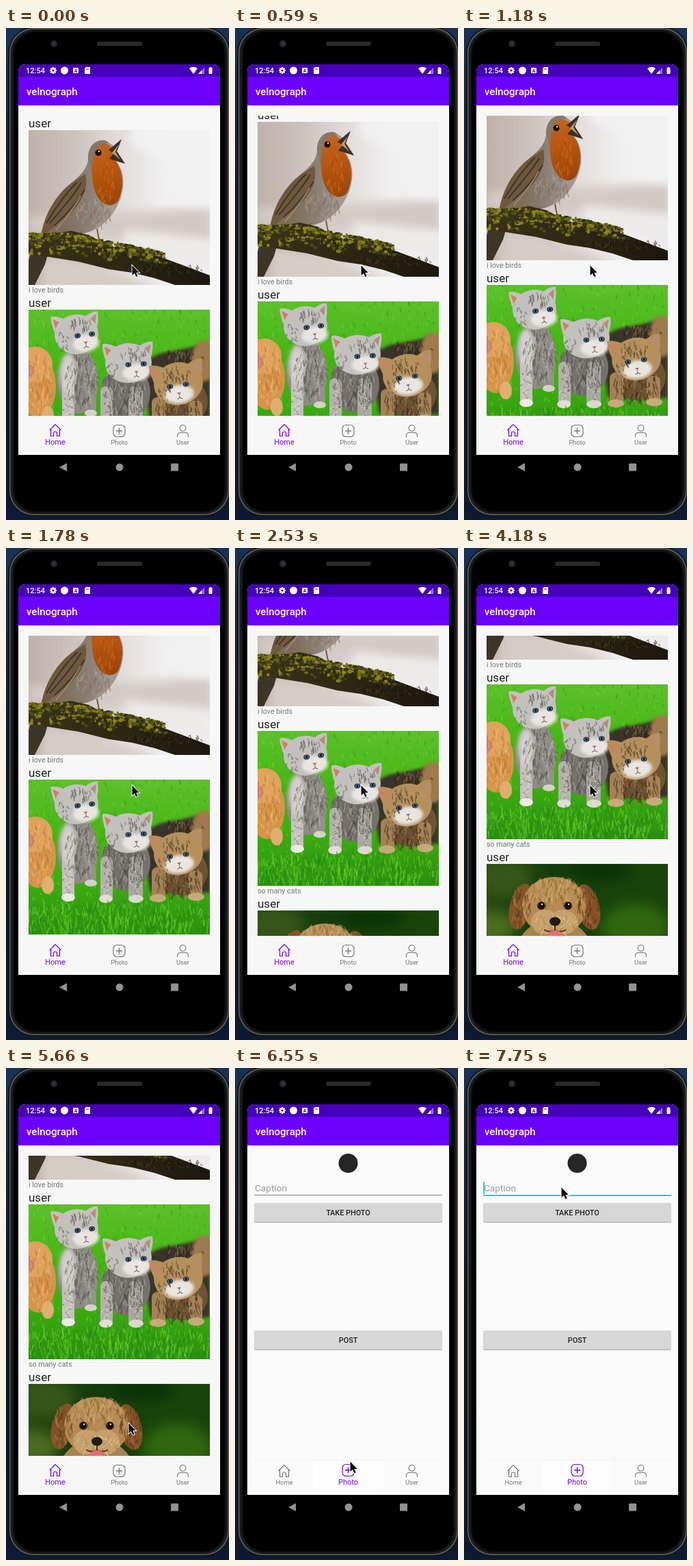
Recreate the animation shown at these times as an HTML page with a canvas. Size 326 by 718 pixels, loop 8 s.

```html
<!DOCTYPE html>
<html lang="en">
<head>
<meta charset="utf-8">
<title>Photo feed</title>
<style>
html, body { margin: 0; width: 100%; height: 100%; overflow: hidden; background: #0b1930; }
canvas { display: block; width: 326px; height: 718px; }
</style>
</head>
<body>
<canvas id="stage" width="326" height="718"></canvas>
<script>
const LOOP = 8000;
const PURPLE = '#6c00fb', DEEP_PURPLE = '#4500b9', GREY = '#757575', TEAL = '#1fd5c3';
const PHOTO_W = 265, PHOTO_H = 226, POST_H = 262;
const stage = document.getElementById('stage').getContext('2d');
let g = stage;

// [time, value...]: values hold until the next time
const scrollSteps = [[0, 0], [140, 3], [290, 7], [590, 12], [740, 18], [890, 24], [1040, 30],
  [1180, 36], [1330, 46], [1480, 56], [1630, 66], [1780, 73], [1930, 79], [2230, 100],
  [2380, 122], [2530, 144], [2830, 149], [3280, 155], [3430, 161], [3580, 167], [4030, 190], [4180, 212]];
const pointerSteps = [[0, 184, 346], [4480, 192, 400], [4630, 214, 510], [4780, 224, 617],
  [4920, 190, 604], [5070, 166, 596], [5660, 179, 518], [5810, 176, 552], [5960, 168, 574],
  [6850, 165, 540], [7000, 160, 455], [7150, 154, 350], [7300, 148, 250], [7450, 143, 185], [7600, 142, 174]];
const OPEN_FORM = 6400, FOCUS = 7600;

const at = (steps, t) => steps.findLast(s => s[0] <= t).slice(1);

function rng(seed) {
  return () => (seed = (seed * 16807) % 2147483647) / 2147483647;
}
function rect(x, y, w, h, color) {
  g.fillStyle = color;
  g.fillRect(x, y, w, h);
}
function round(x, y, w, h, r, color) {
  g.fillStyle = color;
  g.beginPath();
  g.roundRect(x, y, w, h, r);
  g.fill();
}
function oval(x, y, rx, ry, color, turn = 0) {
  g.fillStyle = color;
  g.beginPath();
  g.ellipse(x, y, rx, ry, turn, 0, 7);
  g.fill();
}
function shape(d, color) {
  g.fillStyle = color;
  g.fill(new Path2D(d));
}
function line(d, color, width = 1) {
  g.strokeStyle = color;
  g.lineWidth = width;
  g.stroke(new Path2D(d));
}
function text(s, x, y, size, color, weight = 400, align = 'left') {
  g.font = `${weight} ${size}px Roboto, sans-serif`;
  g.textAlign = align;
  g.textBaseline = 'alphabetic';
  g.fillStyle = color;
  g.fillText(s, x, y);
}
function shade(x0, y0, x1, y1, ...colors) {
  const grad = g.createLinearGradient(x0, y0, x1, y1);
  colors.forEach((c, i) => grad.addColorStop(i / (colors.length - 1), c));
  return grad;
}
function blur(radius, draw) {
  g.filter = `blur(${radius}px)`;
  draw();
  g.filter = 'none';
}
// Short soft strokes scattered inside an ellipse
function fur(x, y, rx, ry, colors, count, seed, lean = 2, length = 6) {
  const rand = rng(seed);
  g.globalAlpha = .6;
  for (let i = 0; i < count; i++) {
    const a = rand() * 6.283, r = Math.sqrt(rand());
    const px = x + Math.cos(a) * r * rx, py = y + Math.sin(a) * r * ry;
    const dx = (rand() - .5) * lean * 2, dy = length * (.5 + rand());
    line(`M${px} ${py}l${dx} ${dy}`, colors[i % colors.length], 1 + rand());
  }
  g.globalAlpha = 1;
}
function photo(draw) {
  const c = document.createElement('canvas');
  c.width = PHOTO_W;
  c.height = PHOTO_H;
  g = c.getContext('2d');
  draw();
  g = stage;
  return c;
}

function bird() {
  rect(0, 0, 265, 226, shade(0, 0, 265, 0, '#bfb2aa', '#cdc3bd', '#e2dddb', '#f1f0f1', '#f3f2f3'));
  blur(7, () => {
    shape('M0 125C90 118 150 122 200 116L270 112V165L150 160L0 150Z', '#d3cac5');
    shape('M150 -5H275V112C220 112 190 90 208 72C225 58 190 40 150 20Z', '#f2f1f2');
    shape('M140 145L270 160V210L140 170Z', '#ece9e9');
    shape('M20 182L90 196L200 235H20Z', '#d6ccc6');
  });
  shape('M8 160L30 175L24 196L9 226H0V190Z', '#3d3528');
  const body = shade(50, 110, 125, 110, '#7d6c57', '#8b8077', '#a29a93');
  shape('M87 44C86 24 97 13 112 15L126 24L136 14L129 31L141 49L128 45C139 59 142 78 134 101C124 126 108 143 84 150C60 156 36 152 18 158C22 126 38 96 63 77C77 65 84 58 87 44Z', body);
  shape('M91 46C90 28 99 20 112 19L124 27L121 40L128 46C139 62 140 84 131 103C121 116 105 108 98 92C92 78 93 62 91 46Z', shade(90, 20, 125, 110, '#c2661f', '#b7550f', '#994409'));
  shape('M87 40C88 22 98 14 112 15L118 19C105 20 97 25 95 40L92 60Z', '#85776a');
  shape('M83 64C88 86 78 108 54 127L18 157C22 122 42 93 63 77Z', '#6f583d');
  line('M77 77Q64 98 31 136M82 87Q66 114 38 139M71 76Q50 96 26 136', '#40352a', 2);
  line('M76 96Q64 118 40 146', '#a48f74', 1.5);
  fur(95, 118, 24, 22, ['#7d746b', '#b0a8a0', '#95705a'], 90, 12, 3, 6);
  fur(114, 75, 15, 28, ['#a84d0c', '#c96e25'], 70, 13, 2, 6);
  shape('M117 29L136 13L129 31L141 49L118 42L124 34Z', '#3d3026');
  shape('M122 33L132 21L127 32L134 43Z', '#c39a71');
  oval(102, 33, 4.6, 4.6, '#17120f');
  oval(103, 31, 1.2, 1.2, '#ddd');
  line('M78 148L72 156M100 144L103 160L115 168', '#765b43', 2);
  shape('M0 151L42 150L62 147L88 153L117 169L151 174L190 184L217 194L265 212V226H214L184 216L151 208L117 203L73 192L29 185L0 181Z', shade(0, 160, 265, 200, '#393218', '#2d2713', '#1c170e'));
  const rand = rng(71);
  for (let i = 0; i < 420; i++) {
    const x = rand() * 200, depth = rand() * rand();
    const y = 151 + (x > 60 ? (x - 60) * .2 : 0) + depth * (x < 130 ? 34 : 24);
    oval(x, y, 1 + rand() * 3, 1 + rand() * 2, ['#6f6b18', '#8b8419', '#4a4a17', '#343116'][i % 4]);
  }
  fur(200, 200, 55, 9, ['#49401f', '#17130d'], 60, 5, 5, 4);
}

// The face sits off-centre by turn, as the head looks aside
function kittenHead(x, y, rx, ry, coat, stripe, turn, tilt, seed) {
  g.save();
  g.translate(x, y);
  g.rotate(tilt);
  for (const s of [-1, 1]) {
    shape(`M${s * rx * .3} ${-ry * .7}Q${s * rx * .8} ${-ry * 1.1} ${s * rx * 1.08} ${-ry * 1.02}Q${s * rx * 1.1} ${-ry * .5} ${s * rx * .9} 0Z`, coat);
    shape(`M${s * rx * .58} ${-ry * .6}L${s * rx} ${-ry * .9}L${s * rx * .88} ${-ry * .25}Z`, s < 0 ? '#d08060' : '#b58c7c');
  }
  oval(0, 0, rx, ry, coat);
  blur(2, () => oval(turn, ry * .5, rx * .6, ry * .42, '#e9e6e2'));
  fur(turn * .6, -ry * .55, rx * .55, ry * .32, [stripe], 26, seed, 2, 6);
  fur(-rx * .65, ry * .2, rx * .25, ry * .5, [stripe], 14, seed + 1, 4, 4);
  for (const s of [-1, 1]) {
    const ex = turn + s * rx * .33;
    oval(ex, ry * .08, 4.4, 3.6, '#2b2f33');
    oval(ex, ry * .08, 3, 2.7, '#46779f');
    oval(ex, ry * .08, 1.5, 1.9, '#090c10');
  }
  shape(`M${turn - 3} ${ry * .42}h6l-3 4Z`, '#a8746c');
  line(`M${turn} ${ry * .56}v3l-4 2m4 -2l4 2`, '#6b5f58');
  g.restore();
}

function kittens() {
  rect(0, 0, 265, 226, shade(0, 0, 0, 226, '#5cc02c', '#48b714', '#3cad10', '#2b8f10'));
  fur(132, 95, 185, 130, ['#6fd03a', '#36a010', '#51c41c'], 800, 17, 3, 5);
  blur(2, () => {
    shape('M165 90Q175 62 215 60L250 52L265 60V165L178 164Z', '#3a3329');
    oval(256, 75, 18, 30, '#a07a4c');
  });
  fur(225, 70, 32, 14, ['#2c2416', '#8c7350'], 60, 8, 4, 8);

  oval(14, 112, 26, 46, '#d6954b');
  oval(10, 80, 25, 26, '#dfa35c');
  shape('M0 72L10 90L0 104Z', '#d18266');
  fur(16, 108, 20, 45, ['#bd7630', '#eebb7b'], 90, 23, 2, 7);
  oval(28, 154, 9, 13, '#dfae70');

  oval(72, 104, 30, 48, '#8e8b85');
  round(49, 102, 18, 74, 8, '#c4c1bc');
  round(83, 92, 16, 60, 8, '#94918b');
  blur(3, () => oval(58, 92, 12, 28, '#d3d1cd'));
  fur(78, 98, 23, 42, ['#55524d', '#74716b', '#b9b6b0'], 150, 31, 4, 8);
  fur(58, 140, 7, 26, ['#77736b', '#e6e3df'], 30, 32, 5, 2);
  oval(58, 172, 10, 6, '#eeeae4');
  oval(91, 151, 9, 5, '#d6d2c9');
  kittenHead(70, 36, 32, 29, '#c3c1bd', '#65625d', 12, -.12, 9);

  oval(142, 121, 36, 41, '#75726c');
  round(105, 112, 18, 67, 8, '#b4b1ab');
  round(146, 112, 21, 66, 8, '#aaa7a1');
  fur(138, 116, 32, 36, ['#44423e', '#a8a59f', '#605d57'], 160, 43, 4, 8);
  fur(114, 149, 7, 22, ['#5b5852', '#dddad5'], 28, 44, 5, 2);
  fur(157, 148, 8, 22, ['#5b5852', '#dddad5'], 28, 45, 5, 2);
  oval(113, 174, 10, 6, '#e3ded5');
  oval(157, 174, 11, 6, '#ddd8cf');
  kittenHead(146, 78, 34, 29, '#c3c1be', '#65625e', 11, -.05, 19);

  oval(224, 134, 38, 35, '#6e5233');
  round(180, 128, 20, 50, 8, '#a38355');
  round(234, 133, 20, 43, 8, '#a38355');
  fur(220, 143, 34, 25, ['#392c1e', '#a98452', '#66492a'], 140, 58, 4, 8);
  oval(189, 173, 12, 6, '#c7aa7b');
  oval(245, 171, 12, 6, '#c7aa7b');
  kittenHead(219, 108, 36, 31, '#b5905d', '#4d3a26', -1, -.15, 29);

  fur(135, 200, 165, 25, ['#57c420', '#238512', '#6fd434', '#319a10'], 600, 67, 4, 11);
}

function puppy() {
  rect(0, 0, 265, 226, shade(0, 0, 265, 100, '#2c4d10', '#143c0b', '#17440a', '#1a430a'));
  blur(9, () => {
    oval(27, 22, 40, 26, '#34561a');
    oval(218, 92, 50, 34, '#2f660f');
    oval(168, 10, 47, 14, '#0c3007');
    oval(8, 92, 35, 24, '#4a6c20');
  });
  oval(99, 135, 57, 55, '#a98352');
  oval(50, 62, 16, 34, '#835328', .25);
  oval(148, 63, 17, 34, '#825127', -.25);
  oval(99, 62, 47, 43, '#b58b53');
  fur(100, 38, 44, 20, ['#d1ae75', '#86602f', '#c49658'], 160, 73, 5, 9);
  fur(50, 60, 14, 29, ['#593519', '#a87338'], 60, 74, 3, 8);
  fur(149, 62, 15, 29, ['#552f18', '#a16a32'], 60, 75, 3, 8);
  oval(86, 85, 21, 18, '#c6a16b');
  oval(112, 85, 21, 18, '#c6a16b');
  fur(99, 87, 34, 14, ['#e2c995', '#a98350'], 60, 76, 5, 5);
  for (const x of [80, 119]) {
    oval(x, 61, 6, 6, '#352111');
    oval(x, 61, 4, 4.5, '#100c0a');
    oval(x + 1, 59, 1.2, 1.2, '#ddd');
  }
  oval(100, 84, 8, 6.5, '#201b19');
  line('M100 90V97Q92 101 84 96M100 97Q108 101 116 96', '#4c2b1a', 2);
  oval(100, 104, 11, 7, '#e46f72');
}

const posts = [
  [photo(bird), 'i love birds'],
  [photo(kittens), 'so many cats'],
  [photo(puppy), '']
];

function phone() {
  rect(0, 0, 326, 718, shade(0, 0, 0, 718, '#173358', '#0c1426', '#0c1a33'));
  round(3, -2, 325, 715, 38, '#151718');
  round(5, 0, 321, 711, 36, '#5c6062');
  round(6.5, 1.5, 318, 708, 35, '#1b1d1e');
  round(10, 4, 311, 703, 33, '#0b0c0c');
  round(12, 6, 307, 699, 32, '#000');
  oval(70, 23, 5, 5, '#242628');
  oval(70, 23, 2.5, 2.5, '#2a3a48');
  round(133, 20, 66, 6, 3, '#2b2d2e');
  for (let x = 136; x < 198; x += 3) rect(x, 22, 1, 2, '#17191a');
  shape('M78 641L89 635V647Z', '#929292');
  oval(166, 641, 5.5, 5.5, '#929292');
  round(241, 635.5, 11, 11, 1, '#929292');
}

function statusBar() {
  text('12:54', 29, 66, 11, '#fff', 500);
  for (let i = 0; i < 8; i++) {
    const a = i * Math.PI / 4;
    line(`M69 62l${Math.cos(a) * 5} ${Math.sin(a) * 5}`, '#fff', 2);
  }
  oval(69, 62, 3.7, 3.7, '#fff');
  oval(69, 62, 1.6, 1.6, DEEP_PURPLE);
  oval(85.5, 62, 5.5, 5.5, '#fff');
  round(98, 58, 8, 8, 1, '#fff');
  text('A', 102, 65, 7, DEEP_PURPLE, 700, 'center');
  shape('M117 57H123V67H115V59Z', '#fff');
  line('M118 59v2M120 59v2', DEEP_PURPLE, 1);
  shape('M268 59Q274 54.5 280 59L274 67Z', '#fff');
  shape('M281 67L290 58V67Z', '#9971dd');
  shape('M281 67L286 62V67Z', '#fff');
  round(296.5, 58, 5, 9, .7, '#fff');
  rect(298, 57, 2, 1, '#fff');
}

function tab(label, x, active, drawIcon) {
  const color = active ? PURPLE : GREY;
  g.save();
  g.translate(x, active ? 587 : 588);
  drawIcon(color);
  g.restore();
  text(label, x, 607.5, active ? 11 : 9.4, color, 400, 'center');
}

function tabs(form) {
  tab('Home', 72, !form, c =>
    line('M-8.5 0L0 -8.5L8.5 0M-6.5 -1.5V8.5H-2.5V3.5Q0 .5 2.5 3.5V8.5H6.5V-1.5', c, 1.2));
  tab('Photo', 165.5, form, c => {
    g.strokeStyle = c;
    g.lineWidth = 1.2;
    g.beginPath();
    g.roundRect(-8.5, -8.5, 17, 17, 5);
    g.stroke();
    line('M-4.5 0H4.5M0 -4.5V4.5', c, 1.3);
  });
  tab('User', 258.5, false, c =>
    line('M-4.5 -4a4.5 4.5 0 1 0 9 0a4.5 4.5 0 1 0 -9 0M-8 9V7Q-8 2.5 -3 2.5H3Q8 2.5 8 7V9', c, 1.1));
}

function feed(scroll) {
  g.save();
  g.beginPath();
  g.rect(33, 128, PHOTO_W, 438);
  g.clip();
  posts.forEach(([picture, caption], i) => {
    const y = 128 + i * POST_H - scroll;
    text('user', 33, y + 17, 17, '#202020');
    g.drawImage(picture, 33, y + 21);
    text(caption, 33, y + 258, 10.7, GREY);
  });
  g.restore();
}

function button(label, y) {
  round(28, y + 1, 275, 28, 2, '#bfc0bf');
  round(28, y, 275, 27, 2, '#d6d7d6');
  text(label, 165.5, y + 17.5, 10.9, '#202020', 500, 'center');
}

function form(focused) {
  oval(165.5, 139, 14, 14, '#262626');
  text('Caption', 29, 180, 13.6, '#9a9a9a');
  if (focused) {
    rect(28, 185, 275, 2, TEAL);
    rect(28, 166, 2, 18, TEAL);
  } else {
    rect(28, 185, 275, 1, '#858585');
  }
  button('TAKE PHOTO', 197);
  button('POST', 383);
  rect(28, 572, 275, 1, '#f4f4f4');
  rect(114, 573, 103, 43, '#fdfdfd');
}

function pointer(x, y) {
  g.save();
  g.translate(x + .5, y + .5);
  const arrow = 'M0 0V14.5L3.4 11.4L5.8 16.8L8.2 15.7L5.8 10.5H10.2Z';
  line(arrow, '#fff', 1.8);
  shape(arrow, '#080808');
  g.restore();
}

function frame(now) {
  const t = now % LOOP, opened = t >= OPEN_FORM;
  phone();
  g.save();
  g.beginPath();
  g.roundRect(18, 53, 295, 570, [10, 10, 0, 0]);
  g.clip();
  rect(18, 53, 295, 570, opened ? '#fafafa' : '#f7f7f7');
  rect(18, 53, 295, 18, DEEP_PURPLE);
  rect(18, 71, 295, 42, PURPLE);
  g.restore();
  statusBar();
  text('velnograph', 30, 98, 15, '#fff', 500);
  if (opened) form(t >= FOCUS);
  else feed(at(scrollSteps, t)[0]);
  tabs(opened);
  pointer(...at(pointerSteps, t));
  requestAnimationFrame(frame);
}
requestAnimationFrame(frame);
</script>
</body>
</html>
```
